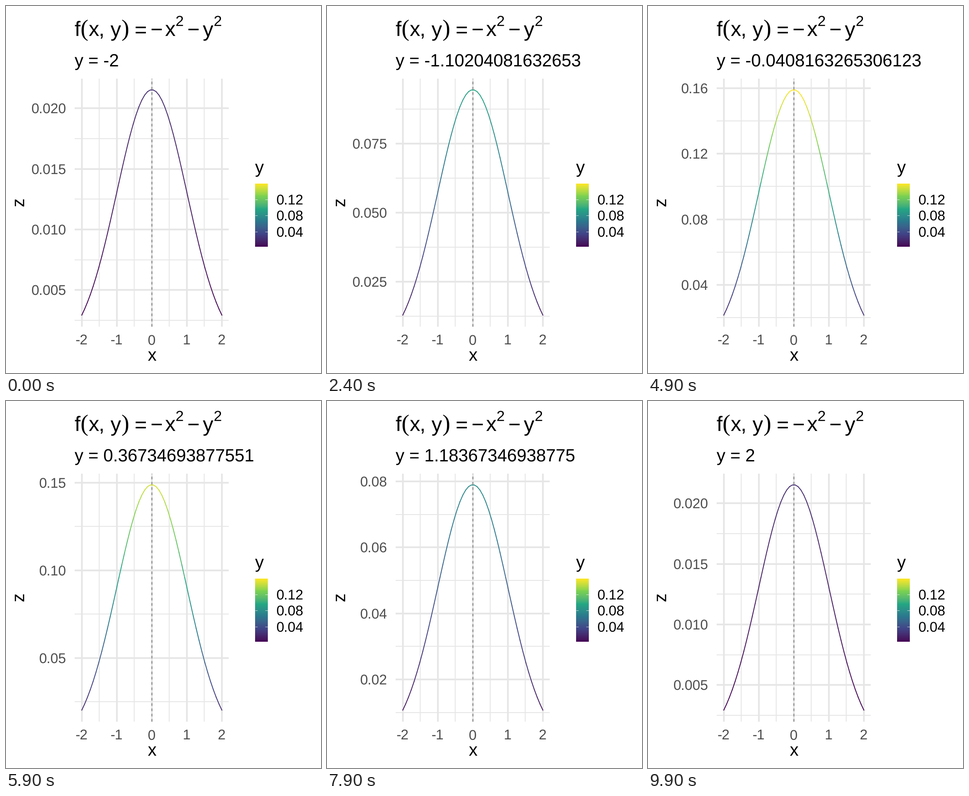
A matplotlib script for the animation above (10 s loop, 693x808 px).

```python
import math

import matplotlib as mpl
import matplotlib.pyplot as plt
import numpy as np
from matplotlib.animation import FuncAnimation
from matplotlib.collections import LineCollection

mpl.rcParams.update({
    "font.family": "Liberation Sans",
    "text.hinting": "none",
    "text.kerning_factor": 0,
})

W, H, DPI = 693, 808, 64
PX = 72 / DPI                      # points per pixel
BASE = 38.5                        # base text size in pixels
SMALL, LARGE = 0.8 * BASE, 1.2 * BASE
LEFT, RIGHT, TOP, BOTTOM = 151.2, 490.4, 160.0, 705.6
BAR_L, BAR_R, BAR_T, BAR_B = 547.9, 575.6, 391.1, 529.7
GRID, TICK_TEXT = "#e6e6e6", "#4d4d4d"

# Density slices: one state per y value
N = 50
grid = -2 + np.arange(N) * (4 / (N - 1))
grid[-1] = 2
Z = np.exp(-(grid[None, :] ** 2 + grid[:, None] ** 2) / 2) / (2 * math.pi)
ZMIN, ZMAX = Z.min(), Z.max()

# Six viridis stops blended in Lab space
TO_XYZ = np.array([[0.4124, 0.3576, 0.1805],
                   [0.2126, 0.7152, 0.0722],
                   [0.0193, 0.1192, 0.9505]])
WHITE = TO_XYZ.sum(axis=1)


def lab_roots(rgb):
    lin = np.where(rgb <= 0.04045, rgb / 12.92, ((rgb + 0.055) / 1.055) ** 2.4)
    return np.cbrt(lin @ TO_XYZ.T / WHITE)


STOPS = np.linspace(0, 1, 6)
ROOTS = lab_roots(mpl.colormaps["viridis"](STOPS)[:, :3])


def ramp(t):
    roots = np.stack([np.interp(t, STOPS, ROOTS[:, c]) for c in range(3)], axis=-1)
    lin = np.clip((roots ** 3 * WHITE) @ np.linalg.inv(TO_XYZ).T, 0, 1)
    rgb = np.where(lin <= 0.0031308, lin * 12.92, 1.055 * lin ** (1 / 2.4) - 0.055)
    return np.clip(rgb, 0, 1)


def unit(z):
    return (z - ZMIN) / (ZMAX - ZMIN)


def nice_step(lo, hi, want=5):
    """Step of the best scoring axis labelling (extended Wilkinson)."""
    span = hi - lo
    best, best_step = -9, None
    for rank, q in enumerate((1, 5, 2, 2.5, 4, 3)):
        for power in range(-4, 0):
            step = q * 10.0 ** power
            if not span / 12 < step < span * 1.5:
                continue
            for k in range(2, 11):
                first = math.floor(hi / step) - (k - 1)
                for start in range(first, math.ceil(lo / step) + 1):
                    a, b = start * step, (start + k - 1) * step
                    simple = 0.2 * (5 - rank) - 1 + (start <= 0 <= start + k - 1)
                    cover = 1 - 0.5 * ((hi - b) ** 2 + (lo - a) ** 2) / (0.1 * span) ** 2
                    r = 1 / step
                    ideal = (want - 1) / (max(b, hi) - min(a, lo))
                    dense = 2 - max(r / ideal, ideal / r)
                    score = 0.25 * simple + 0.2 * cover + 0.5 * dense + 0.05
                    if score > best + 1e-9:
                        best, best_step = score, step
    return best_step


def inside(lo, hi, step, shift):
    k = np.arange(-1, 30)
    v = (k + shift) * step
    return v[(v >= lo) & (v <= hi)]


def decimals(values):
    d = 0
    while np.any(np.abs(np.round(values, d) - values) > 1e-9):
        d += 1
    return d


fig = plt.figure(figsize=(W / DPI, H / DPI), dpi=DPI, facecolor="white")
ax = fig.add_axes([0, 0, 1, 1])
ax.axis("off")


def text(x, y, s, size=BASE, color="black", **kw):
    return ax.text(x, y, s, fontsize=size * PX, color=color, va="baseline", **kw)


def lines(segs, width, color, z, cap="butt"):
    lc = LineCollection(segs, linewidths=width * PX, colors=color, zorder=z,
                        capstyle=cap)
    ax.add_collection(lc, autolim=False)
    return lc


def px_x(x):
    return (LEFT + RIGHT) / 2 + np.asarray(x) * (RIGHT - LEFT) / 4.4


def across(ys):
    return [[(LEFT, y), (RIGHT, y)] for y in ys]


def upright(xs):
    return [[(x, BOTTOM), (x, TOP)] for x in xs]


# Headings: f(x, y) = -x^2 - y^2
BASELINE = 66.3
for x, s in ((150.4, "f"), (181, "x"), (204.3, ","), (229.6, "y"),
             (349.5, "x"), (433, "y")):
    text(x, BASELINE, s, LARGE)
for x, s in ((164.2, "("), (253.8, ")")):
    text(x, BASELINE, s, LARGE * 1.12, family="Liberation Serif")
for x, s in ((282.8, "="), (318, "\u2212"), (399, "\u2212")):
    text(x, BASELINE + 1.6, s, LARGE)
for x in (372, 456):
    text(x, 43.5, "2", LARGE * 0.7)
subtitle = text(LEFT, 133, "")

# Axes
for v in range(-2, 3):
    text(px_x(v) - 0.8, 745.3, str(v), SMALL, TICK_TEXT, ha="center")
text(px_x(0), 781.3, "x", ha="center")
text(39.2, (TOP + BOTTOM) / 2 - 1, "z", ha="center", rotation=90,
     rotation_mode="anchor")
lines(upright(px_x(np.arange(-1.5, 2))), 1.87, GRID, 1)
lines(upright(px_x(np.arange(-2, 3))), 3.73, GRID, 1)
minor = lines([], 1.87, GRID, 1)
major = lines([], 3.73, GRID, 1)
labels = [text(132.4, 0, "", SMALL, TICK_TEXT, ha="right") for _ in range(10)]

# Curve and centre line
curve = lines([], 1.9, "black", 3, "round")
DASH, THIN = 5.8, 1.6
ax.plot([px_x(0)] * 2, [BOTTOM, TOP], color="#707070", lw=THIN * PX, zorder=4,
        dashes=(DASH / THIN, DASH / THIN), dash_capstyle="butt")

# Colour bar
text(BAR_L, 367.6, "y")
ax.imshow(ramp(np.linspace(1, 0, 300))[:, None, :], aspect="auto", zorder=2,
          extent=(BAR_L, BAR_R, BAR_B, BAR_T), interpolation="nearest")
for v in (0.04, 0.08, 0.12):
    y = BAR_B - unit(v) * (BAR_B - BAR_T)
    notch = (BAR_R - BAR_L) / 5
    lines([[(BAR_L, y), (BAR_L + notch, y)], [(BAR_R - notch, y), (BAR_R, y)]],
          0.7, "white", 3)
    text(594.6, y + 10.8, f"{v:.2f}", SMALL)

ax.set_xlim(0, W)
ax.set_ylim(H, 0)


def draw(i):
    # The curve steps on even ticks, the caption one tick later
    z = Z[i // 2]
    subtitle.set_text(f"y = {grid[max(i - 1, 0) // 2]:.15g}")

    pad = 0.05 * (z.max() - z.min())
    lo, hi = z.min() - pad, z.max() + pad

    def px_y(v):
        return BOTTOM - (v - lo) / (hi - lo) * (BOTTOM - TOP)

    step = nice_step(lo, hi)
    ticks = inside(lo, hi, step, 0)
    major.set_segments(across(px_y(ticks)))
    minor.set_segments(across(px_y(inside(lo, hi, step, 0.5))))
    d = decimals(ticks)
    for n, label in enumerate(labels):
        shown = n < len(ticks)
        label.set_visible(shown)
        if shown:
            label.set_text(f"{ticks[n]:.{d}f}")
            label.set_y(px_y(ticks[n]) + 10.8)

    pts = np.column_stack([px_x(grid), px_y(z)])
    curve.set_segments(np.stack([pts[:-1], pts[1:]], axis=1))
    curve.set_color(ramp(unit(z[:-1])))
    return []


anim = FuncAnimation(fig, draw, frames=100, interval=100, init_func=lambda: draw(0),
                     repeat=True, repeat_delay=0, blit=False)
plt.show()
```
